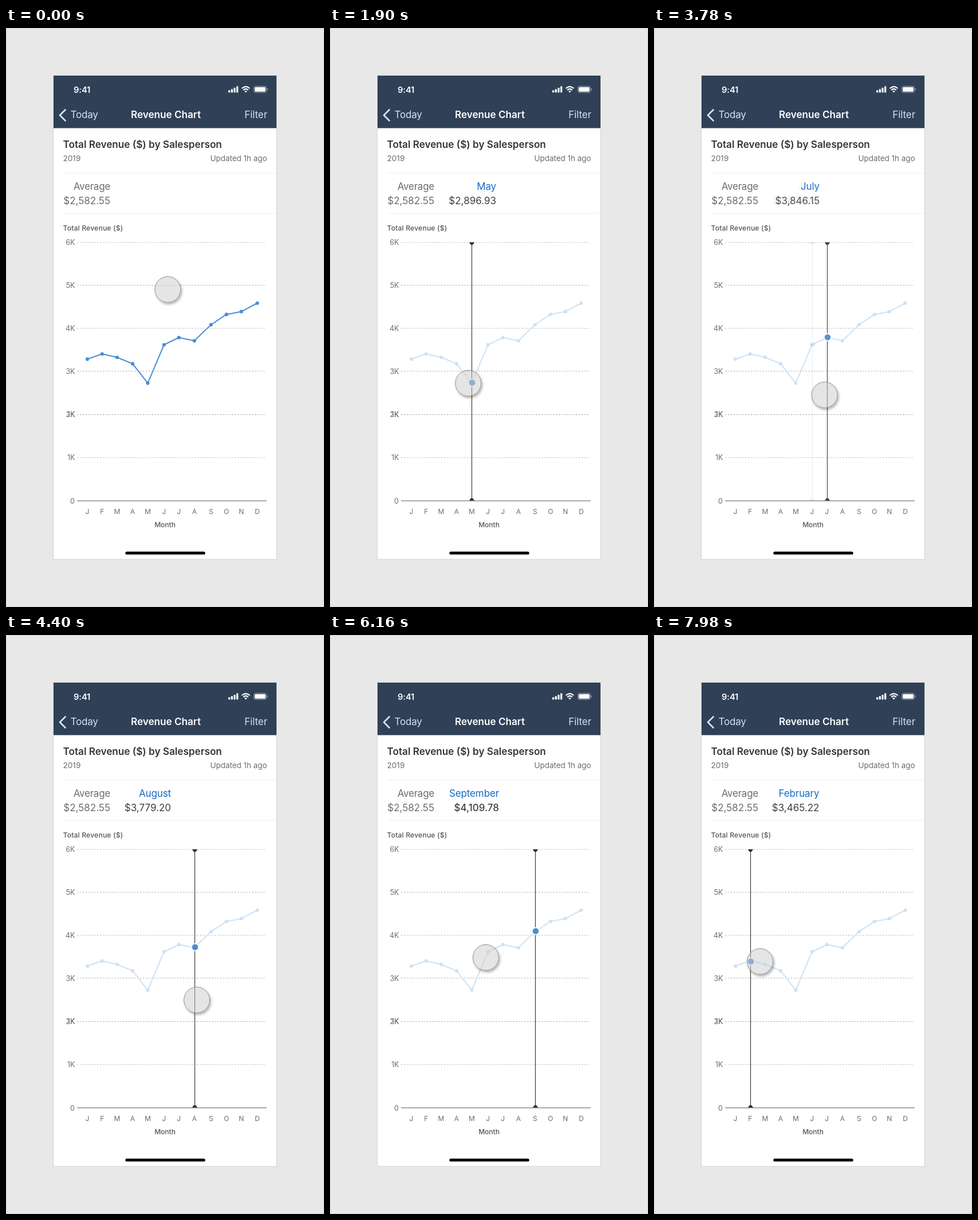
An HTML page for the animation above (8 s loop, 555 by 1009 pixels).

```html
<!DOCTYPE html>
<html lang="en">
<head>
<meta charset="utf-8">
<title>Revenue Chart</title>
<style>
  html, body { margin: 0; width: 100%; height: 100%; overflow: hidden; background: #e8e8e8; }
  svg { position: absolute; left: 0; top: 0; display: block; }
  text { font-family: Inter, Roboto, "Liberation Sans", sans-serif; }
  #touch {
    position: absolute; left: -23px; top: -23px; width: 46px; height: 46px;
    box-sizing: border-box; border: 1px solid #8e8e8e; border-radius: 50%;
    background: rgba(205, 205, 205, .52);
    box-shadow: 2px 3px 4px rgba(0, 0, 0, .3);
  }
</style>
</head>
<body>
<svg id="stage" width="555" height="1009" viewBox="0 0 555 1009"></svg>
<div id="touch"></div>
<script>
const LOOP = 8000;
const stage = document.getElementById('stage');
const touch = document.getElementById('touch');

function add(parent, tag, attrs, content) {
  const el = document.createElementNS('http://www.w3.org/2000/svg', tag);
  for (const k in attrs) el.setAttribute(k, attrs[k]);
  if (content) el.textContent = content;
  parent.appendChild(el);
  return el;
}
const rect = (x, y, width, height, fill, more) =>
  add(stage, 'rect', { x, y, width, height, fill, ...more });
const line = (x1, y1, x2, y2, stroke, width, more) =>
  add(stage, 'line', { x1, y1, x2, y2, stroke, 'stroke-width': width, ...more });
const label = (parent, str, x, y, size, fill, anchor = 'start', weight = 400, spacing = 0) =>
  add(parent, 'text', {
    x, y, fill, 'font-size': size, 'text-anchor': anchor,
    'font-weight': weight, 'letter-spacing': spacing
  }, str);

// Stage and phone
rect(.5, .5, 554, 1008, '#e8e8e8', { stroke: '#d6d6d6' });
rect(82.5, 83, 390, 843, '#fff', { stroke: '#d2d2d2' });
rect(83, 83, 389, 91.5, '#2f4057');

// Status bar
label(stage, '9:41', 118, 113, 14.7, '#fff', 'start', 600, -.1);
[4, 6, 8.5, 11].forEach((h, i) => rect(388 + i * 4.7, 112.5 - h, 3.2, h, '#fff', { rx: .8 }));
const wifi = add(stage, 'g', { fill: 'none', stroke: '#fff', 'stroke-width': 2.1 });
add(wifi, 'path', { d: 'M411.6 105.3 Q418.5 98.8 425.4 105.3' });
add(wifi, 'path', { d: 'M414.2 108.2 Q418.5 104.2 422.8 108.2' });
add(stage, 'path', { d: 'M416.2 110.3 Q418.5 108.2 420.8 110.3 L418.5 112.8Z', fill: '#fff' });
rect(432.5, 101.5, 22, 11, 'none', { rx: 3, stroke: '#fff', 'stroke-opacity': .5 });
rect(434, 103, 19, 8, '#fff', { rx: 1.7 });
rect(455.5, 105, 1.4, 4, '#fff', { rx: .7, opacity: .5 });

// Navigation bar
add(stage, 'path', {
  d: 'M103.5 142.5 L94 152 L103.5 161.5', fill: 'none', stroke: '#d1e8ff',
  'stroke-width': 2.7, 'stroke-linecap': 'round', 'stroke-linejoin': 'round'
});
label(stage, 'Today', 112.5, 157, 17, '#cfe3f8', 'start', 400, -.2);
label(stage, 'Revenue Chart', 279, 157, 17.1, '#fff', 'middle', 600);
label(stage, 'Filter', 456, 157, 17, '#cfe3f8', 'end', 400, -.1);

// Headings
label(stage, 'Total Revenue ($) by Salesperson', 99.5, 208.7, 17.15, '#32363a', 'start', 600);
label(stage, '2019', 99.5, 231.7, 13.6, '#6a6d70');
label(stage, 'Updated 1h ago', 455.5, 231.7, 13.5, '#6a6d70', 'end', 400, -.05);
line(100, 253, 472, 253, '#ededed', 1);
line(100, 323, 472, 323, '#ededed', 1);
label(stage, 'Average', 182, 281.5, 17, '#6a6d70', 'end', 400, -.25);
label(stage, '$2,582.55', 182, 307.3, 17, '#6a6d70', 'end');
label(stage, 'Total Revenue ($)', 99.5, 353.2, 12.2, '#515559', 'start', 500, .15);

// Axes
const GRID = { '6K': 373.7, '5K': 448.5, '4K': 523.3, '3K': 598, '2K': 673.6, '1K': 748.6 };
for (const k in GRID) {
  const y = GRID[k], dark = k === '2K';
  line(124, y, 454, y, dark ? '#b2b2b2' : '#c8c8c8', 1.3, { 'stroke-dasharray': '2.5 2.5' });
  label(stage, k, 120.5, y + 4.5, 12.5, '#6a6d70', 'end');
  if (dark) label(stage, '1K', 120.5, y + 4.5, 12.5, '#6a6d70', 'end');
}
line(124, 824, 455, 824, '#8d9094', 1.5);
label(stage, '0', 120, 828.5, 12.5, '#6a6d70', 'end');
label(stage, 'Month', 277.5, 870.2, 12, '#515559', 'middle', 500);

// Series
const POINTS = [
  [142, 577], [167.8, 568], [194, 574], [221, 585.2], [247.4, 618.8], [275.8, 552],
  [301.8, 539.5], [328.8, 545], [357.8, 517], [384.8, 499.2], [410.8, 494.2], [438.5, 479.5]
];
const series = add(stage, 'g', {});
add(series, 'polyline', {
  points: POINTS.join(' '), fill: 'none', stroke: 'currentColor',
  'stroke-width': 2, 'stroke-linejoin': 'round'
});
POINTS.forEach(([x, y], i) => {
  add(series, 'circle', { cx: x, cy: y, r: 3.1, fill: 'currentColor' });
  label(stage, 'JFMAMJJASOND'[i], x, 847.2, 12, '#6a6d70', 'middle');
});

rect(208.3, 912.4, 139.4, 5.2, '#000', { rx: 2.6 });

// Selections: month index, name, value, right edge, dot height, fade start, fade length, weight
const PICKS = [
  [4, 'May', '$2,896.93', 290, 618, 1840, 0, 400],
  [5, 'June', '$3,652.40', 290, 551, 3020, 300, 400],
  [6, 'July', '$3,846.15', 289, 539, 3560, 240, 400],
  [7, 'August', '$3,779.20', 288, 544, 3960, 240, 400],
  [8, 'September', '$4,109.78', 295, 516, 4500, 260, 500],
  [1, 'February', '$3,465.22', 288.5, 569, 6760, 300, 400]
];
const marks = PICKS.map(([i, name, value, right, y, , , weight]) => {
  const g = add(stage, 'g', {});
  const x = Math.round(POINTS[i][0]) + .5;
  add(g, 'line', { x1: x, y1: 374, x2: x, y2: 823, stroke: '#3a3a3a', 'stroke-width': 1.2 });
  add(g, 'path', {
    d: `M${x - 4.7} 373.6h9.4l-3 4.2h-3.4z M${x - 4.7} 823.6h9.4l-3 -4.2h-3.4z`, fill: '#2b2b2b'
  });
  add(g, 'circle', { cx: x + .5, cy: y, r: 7, fill: '#fff' });
  add(g, 'circle', { cx: x + .5, cy: y, r: 5.3, fill: '#4a8cd6' });
  label(g, name, right, 281.5, 17, '#146ac8', 'end', 400, -.12);
  label(g, value, right, 307.3, 17, '#3c4044', 'end', weight);
  return g;
});

// Touch path: time, x, y
const PATH = [
  [0, 282.3, 455.7], [660, 282.3, 455.7], [1440, 241.3, 619], [2540, 241.3, 619],
  [3120, 263, 640], [3340, 267, 641], [4200, 328, 637], [4400, 333, 636],
  [4760, 364.4, 634], [5640, 364.4, 634], [6440, 207, 534], [6620, 178.3, 555],
  [6800, 169, 561], [7560, 169, 561], [7980, 185, 569], [8300, 235, 594]
];
const slope = (i, k) => (PATH[i + 1][k] - PATH[i][k]) / (PATH[i + 1][0] - PATH[i][0]);

// Monotone tangent: flat at rests and turns
function tangent(i, k) {
  if (i === 0 || i === PATH.length - 1) return 0;
  const a = slope(i - 1, k), b = slope(i, k);
  return a * b <= 0 ? 0 : 2 * a * b / (a + b);
}
function along(t, k) {
  let i = 0;
  while (i < PATH.length - 2 && PATH[i + 1][0] <= t) i++;
  const p = PATH[i], q = PATH[i + 1], d = q[0] - p[0], u = (t - p[0]) / d, v = 1 - u;
  return p[k] * (1 + 2 * u) * v * v + q[k] * u * u * (3 - 2 * u)
    + d * (tangent(i, k) * u * v * v - tangent(i + 1, k) * u * u * v);
}

function shown(i, t) {
  if (i >= PICKS.length) return 0;
  const [, , , , , start, length] = PICKS[i];
  return length ? Math.min(1, Math.max(0, (t - start) / length)) : +(t >= start);
}

function draw(t) {
  series.setAttribute('color', shown(0, t) ? '#cfe2f5' : '#4a8cd6');
  marks.forEach((g, i) => g.setAttribute('opacity', shown(i, t) * (1 - shown(i + 1, t))));
  touch.style.transform = `translate(${along(t, 1)}px, ${along(t, 2)}px)`;
}

const began = performance.now();
function tick() {
  draw((performance.now() - began) % LOOP);
  requestAnimationFrame(tick);
}
tick();
</script>
</body>
</html>
```
